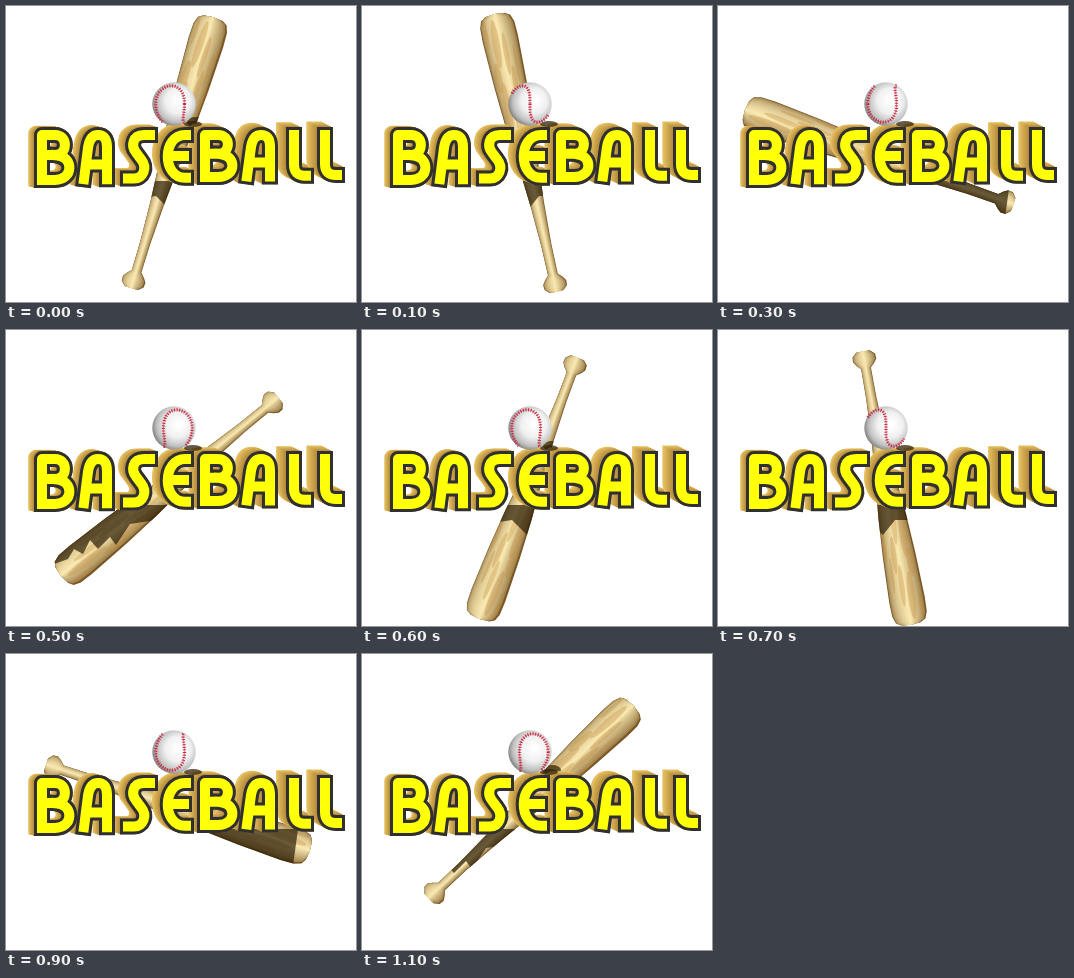
Animation, 350 px wide and 296 px high, one loop 1200 ms. Source, as an HTML page with a canvas:

```html
<!DOCTYPE html>
<html>
<head>
<meta charset="utf-8">
<title>Baseball</title>
<style>
html, body { margin: 0; width: 350px; height: 296px; overflow: hidden; background: #fff }
canvas { display: block }
</style>
</head>
<body>
<canvas id="stage" width="350" height="296"></canvas>
<script>
const g = document.getElementById('stage').getContext('2d');
const TAU = Math.PI * 2, STEP = 100, POSES = 12;
const wave = (n, peak) => Math.cos((n - peak) * TAU / POSES);
const mix = (a, b, t) => a.map((v, i) => Math.round(v + (b[i] - v) * t));

// Lettering: centre lines of the strokes, 45 high
const GLYPHS = {
  B: 'M0 45V0H13C26 0 26 19 14 20H9M14 20C32 21 32 45 13 45H0',
  A: 'M0 45L4 13Q6 0 14 0Q23 0 23 12V45M4 30H23',
  S: 'M24 0H18C6 0 5 12 10 18L15 25C22 34 17 45 8 45H2',
  E: 'M18 0H17C-6 0 -6 45 17 45H18M4 22H16',
  L: 'M0 0V33Q0 45 11 45H12'
};
const LEFTS = [36, 78, 120, 162, 199, 241, 288, 319];
const letters = [...'BASEBALL'].map((c, i) => {
  const path = new Path2D();
  path.addPath(new Path2D(GLYPHS[c]), new DOMMatrix([1, 0, 0, 1 - i * 0.016, LEFTS[i], 129]));
  return path;
});

function stroke(path, color, width) {
  g.strokeStyle = color;
  g.lineWidth = width;
  g.stroke(path);
}

function drawDepth() {
  letters.forEach((path, i) => {
    for (let k = 10; k >= 0; k--) {
      g.save();
      g.translate(-(6 + i * 0.7) * k / 10, -(1.5 + i * 0.6) * k / 10);
      stroke(path, `rgb(${mix([176, 134, 56], [232, 194, 98], k / 10)})`, 15.5);
      g.restore();
    }
  });
}

function drawFaces() {
  letters.forEach(path => stroke(path, '#303030', 16));
  letters.forEach(path => stroke(path, '#ffff08', 10));
}

// Bat outline: distance from the tip, half width
const PROFILE = [[0, 0], [1, 10], [4, 15], [11, 17.5], [25, 18], [70, 16.5], [110, 14],
  [150, 10], [190, 7], [230, 5.2], [259, 5], [263, 9], [267, 11.8], [272, 11.5], [276, 7], [276, 0]];

function batPath(left, right) {
  const p = new Path2D();
  PROFILE.forEach(([y, w]) => p.lineTo(w * right, y - 138));
  [...PROFILE].reverse().forEach(([y, w]) => p.lineTo(-w * left, y - 138));
  p.closePath();
  return p;
}

// Shadow of the lettering, in stage coordinates
const SHADOW = new Path2D('M40 175L48 234L62 229L68 219L77 224L84 210L92 219L104 207L110 215' +
  'L124 194L150 190L165 205L177 190L205 190L240 205L287 212L292 175Z');

function drawBat(n) {
  const angle = (18.7 - 30 * n - 2 * wave(n, -0.7)) * TAU / 360;
  const light = -0.6 * Math.cos(angle) - 0.8 * Math.sin(angle);
  g.save();
  g.translate(166.5 + 5.5 * wave(n, 9), 152.5 - 6 * wave(n, 0.4));
  g.rotate(angle);
  g.scale(1, (140.5 + 2 * wave(n, 2)) / 138);
  for (let i = 0; i <= 14; i++) {
    const t = i / 14, k = 1 - t, shift = t * k * light * 0.9;
    g.fillStyle = `rgb(${mix([122, 88, 38], [252, 236, 180], t ** 0.45)})`;
    g.fill(batPath(k - shift, k + shift));
  }
  g.clip(batPath(1, 1));
  g.fillStyle = 'rgba(190,130,55,.32)';
  for (let i = 0; i < 9; i++) {
    g.beginPath();
    g.ellipse((i * 7 % 11 - 5) * 2.6, -120 + i * 53 % 95, 1.6 + i % 3, 14 + i * 5 % 13, 0.04, 0, TAU);
    g.fill();
  }
  g.setTransform(1, 0, 0, 1, 0, 0);
  g.fillStyle = 'rgba(44,30,8,.7)';
  g.fill(SHADOW);
  g.beginPath();
  g.ellipse(190, 116, 9, 5, 0, 0, TAU);
  g.fill();
  g.restore();
}

function seamPoint(t, turn) {
  const x = 0.75 * Math.cos(t) + 0.25 * Math.cos(3 * t);
  const y = 0.75 * Math.sin(t) - 0.25 * Math.sin(3 * t);
  const c = Math.cos(turn), s = Math.sin(turn);
  return { x: 168 + 21 * (y * c + x * s), y: 98 + 21 * 0.866 * Math.sin(2 * t), z: x * c - y * s };
}

function drawBall(n) {
  const fill = g.createRadialGradient(173, 94, 2, 171, 96, 26);
  fill.addColorStop(0, '#fff');
  fill.addColorStop(0.45, '#f0f0f0');
  fill.addColorStop(0.78, '#c0c0c0');
  fill.addColorStop(1, '#777');
  g.fillStyle = fill;
  g.beginPath();
  g.arc(168, 98, 21.7, 0, TAU);
  g.fill();
  const seam = new Path2D();
  for (let i = 0, open = false; i <= 160; i++) {
    const p = seamPoint(i * TAU / 160, (1 - n) * TAU / POSES);
    if (p.z > 0.02) open ? seam.lineTo(p.x, p.y) : seam.moveTo(p.x, p.y);
    open = p.z > 0.02;
  }
  g.lineCap = 'butt';
  stroke(seam, 'rgba(205,60,75,.7)', 0.8);
  g.setLineDash([1, 1.6]);
  stroke(seam, '#c62840', 3.2);
  g.setLineDash([]);
}

function draw() {
  const n = Math.floor(performance.now() / STEP) % POSES;
  g.fillStyle = '#fff';
  g.fillRect(0, 0, 350, 296);
  g.lineJoin = 'round';
  drawBat(n);
  g.lineCap = 'square';
  drawDepth();
  g.fillStyle = 'rgba(50,35,10,.75)';
  g.beginPath();
  g.ellipse(187, 118, 9, 3, 0, 0, TAU);
  g.fill();
  drawBall(n);
  g.lineCap = 'square';
  drawFaces();
  requestAnimationFrame(draw);
}
draw();
</script>
</body>
</html>
```
